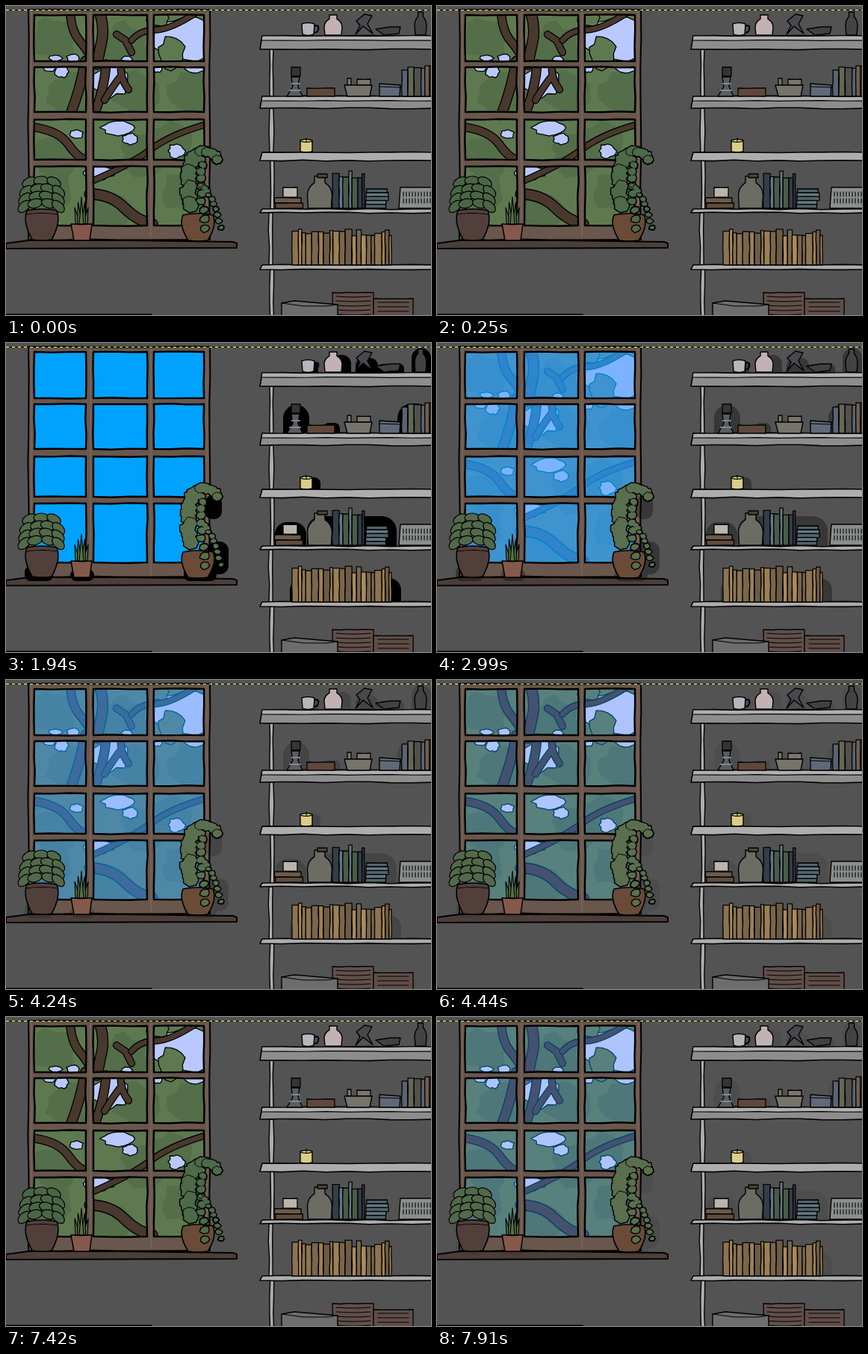
An HTML page with a canvas for the animation above (8 s loop, 569x414 px).

```html
<!DOCTYPE html>
<html lang="en">
<head>
<meta charset="utf-8">
<title>Window and shelves</title>
<style>
  html, body { margin: 0; width: 100%; height: 100%; overflow: hidden; background: #535353; }
  canvas { display: block; width: 569px; height: 414px; }
</style>
</head>
<body>
<canvas id="stage" width="569" height="414"></canvas>
<script>
const ctx = document.getElementById('stage').getContext('2d');
const LOOP = 8000;
const INK = '#000000';
const GAMMA = 2.2;
const OVERLAY = [0, 162, 255];
ctx.lineJoin = ctx.lineCap = 'round';

// Reseeded for every picture, so the hand-drawn wobble stays still.
let seed;
const random = () => (seed = (seed * 16807) % 2147483647) / 2147483647;
const between = (lo, hi) => lo + (hi - lo) * random();
const pick = list => list[Math.floor(random() * list.length)];

function polygon(points) {
  const path = new Path2D();
  points.forEach(([x, y]) => path.lineTo(x, y));
  path.closePath();
  return path;
}

// Straight edges broken into short, slightly shaky pieces.
function rough(corners, step = 18, amp = 0.8) {
  return polygon(corners.flatMap(([x, y], i) => {
    const [nx, ny] = corners[(i + 1) % corners.length];
    const n = Math.max(1, Math.round(Math.hypot(nx - x, ny - y) / step));
    return Array.from({ length: n }, (_, k) => [
      x + (nx - x) * k / n + (k && between(-amp, amp)),
      y + (ny - y) * k / n + (k && between(-amp, amp))
    ]);
  }));
}

const corners = (x0, y0, x1, y1) => [[x0, y0], [x1, y0], [x1, y1], [x0, y1]];

function blob(cx, cy, rx, ry, n = 16) {
  return polygon(Array.from({ length: n }, (_, i) => {
    const angle = i / n * Math.PI * 2;
    const r = between(0.8, 1.15);
    return [cx + rx * r * Math.cos(angle), cy + ry * r * Math.sin(angle)];
  }));
}

function paint(path, fill, lw = 1.4, ink = INK) {
  if (fill) { ctx.fillStyle = fill; ctx.fill(path); }
  if (lw) { ctx.strokeStyle = ink; ctx.lineWidth = lw; ctx.stroke(path); }
}
const shape = (d, fill, lw, ink) => paint(new Path2D(d), fill, lw, ink);
const line = (d, lw = 1.1, ink = INK) => shape(d, null, lw, ink);
const block = (x, y, w, h, fill) => paint(rough(corners(x, y, x + w, y + h), 12, 0.5), fill, 1.3);

// Blend in linear light, as the overlay layer does.
function tint(hex, a) {
  const rgb = OVERLAY.map((over, i) => {
    const base = parseInt(hex.slice(1 + i * 2, 3 + i * 2), 16);
    const v = (base / 255) ** GAMMA * (1 - a) + (over / 255) ** GAMMA * a;
    return Math.round(255 * v ** (1 / GAMMA));
  });
  return `rgb(${rgb})`;
}

// Overlay strength: first step, last step, number of steps, value reached.
const fades = [
  [1940, 1940, 1, 1], [2550, 3290, 12, 0.3], [3470, 3470, 1, 0.27], [3700, 3890, 6, 0.42],
  [4040, 4040, 1, 0.4], [4240, 4440, 4, 0.14], [5410, 5410, 1, 0], [5970, 5970, 1, 0.14],
  [7420, 7420, 1, 0], [7910, 7910, 1, 0.14]
];

function strength(t) {
  let a = 0;
  for (const [t0, t1, steps, to] of fades) {
    if (t < t0) break;
    const done = t >= t1 ? steps : Math.floor((t - t0) / (t1 - t0) * (steps - 1)) + 1;
    a += (to - a) * done / steps;
  }
  return a;
}

const columns = [[38, 107], [117, 189], [198, 265]];
const rows = [[12, 74], [82, 142], [152, 206], [215, 294]];

// Centre and radii of the holes in the foliage.
const gaps = [
  [66, 70, 9, 4], [90, 70, 9, 6], [121, 64, 5, 10], [162, 71, 7, 4], [238, 44, 44, 32],
  [58, 83, 9, 5], [74, 88, 9, 8], [140, 100, 24, 22], [203, 84, 6, 5], [252, 84, 14, 6],
  [94, 172, 9, 6], [150, 163, 22, 10], [166, 178, 10, 8], [228, 194, 11, 10], [124, 223, 20, 10]
];
const clumps = [[202, 16, 16, 12], [221, 64, 18, 22]];
const branches = [
  ['M86 10Q88 34 98 46T112 66', 11], ['M126 10Q132 30 128 48T122 78', 14],
  ['M148 38L160 46L168 62', 9], ['M168 46Q180 32 200 32T256 8', 8],
  ['M106 74Q100 110 86 146', 13], ['M134 78Q132 110 118 146', 12],
  ['M154 78Q152 96 164 112M152 96Q140 112 132 126', 9],
  ['M34 162Q70 166 84 186T112 208', 11], ['M270 158Q220 172 194 192T112 236', 8],
  ['M112 252Q140 252 158 270T196 292', 14]
];

function drawTree(a) {
  const ink = tint(INK, a);
  const leaf = tint('#5e7950', a);
  ctx.fillStyle = leaf;
  ctx.fillRect(30, 6, 244, 300);
  for (const [y0, y1] of rows)
    for (const [x0, x1] of columns)
      paint(blob(between(x0 + 20, x1), between(y0 + 30, y1), 32, 28), tint('#536e48', a), 0);
  gaps.forEach(g => paint(blob(...g), tint('#b9c9ff', a), 1.3, ink));
  clumps.forEach(c => paint(blob(...c), leaf, 1.3, ink));
  for (const [d, w] of branches) {
    line(d, w + 1.3, ink);
    line(d, w - 1.3, tint('#49382d', a));
  }
}

function drawWindow(a) {
  paint(rough(corners(30, 5, 273, 313), 40), '#69574d', 2);
  for (const x of [34, 113, 194, 269]) line(`M${x} 8V310`, 2, '#74625a');

  const panes = new Path2D();
  for (const [y0, y1] of rows)
    for (const [x0, x1] of columns) panes.addPath(rough(corners(x0, y0, x1, y1), 22));
  ctx.save();
  ctx.clip(panes);
  drawTree(a);
  ctx.restore();
  paint(panes, null, 2.4);

  shape('M0 318L30 314H160L304 316L309 318V324L0 325Z', '#4c3e38', 2);
}

const floors = [40, 121, 196, 272, 347];
const depths = [18, 16, 11, 5, 6];

function drawShelves() {
  floors.forEach((y, i) => {
    const top = y + depths[i];
    const end = floors[i + 1] || 420;
    const x = 353 + between(-2, 1);
    paint(rough(corners(x, top, x + 5, end), 24, 1), '#adadad', 1.4);
  });
  floors.forEach((y, i) => {
    const bottom = y + depths[i];
    const deep = depths[i] > 12;
    paint(rough([[343, y], [573, y], [573, bottom], [340, bottom]], 30), deep ? '#8d8d8d' : '#adadad', 1.6);
    if (deep) paint(rough([[343, y], [573, y], [573, y + 6], [342, y + 6]], 30, 0.5), '#b0b0b0', 1.2);
  });
}

// Shelf, left, right and height of each soft shadow.
const shelfShadows = [
  [0, 398, 418, 16], [0, 436, 462, 24], [0, 468, 498, 20], [0, 498, 533, 12], [0, 543, 569, 33],
  [1, 371, 406, 38], [1, 425, 447, 14], [1, 524, 569, 40], [2, 398, 421, 16],
  [3, 360, 402, 32], [3, 403, 523, 40], [4, 380, 529, 32]
];

function drawShadows(a) {
  if (!a) return;
  const path = new Path2D();
  for (const [i, x0, x1, h] of shelfShadows)
    path.roundRect(x0, floors[i] - h, x1 - x0, h, [Math.min(h, x1 - x0) / 2, Math.min(h, x1 - x0) / 2, 0, 0]);
  for (const [cx, w, h] of [[44, 38, 20], [102, 32, 16], [260, 44, 20]])
    path.roundRect(cx - w / 2, 319 - h, w, h, 8);
  path.roundRect(270, 266, 28, 44, 12);
  path.roundRect(266, 204, 23, 32, 10);
  ctx.globalAlpha = 1 - (1 - a) ** (1 / GAMMA);
  paint(path, INK, 0);
  ctx.globalAlpha = 1;
}

function pot(cx, top, bottom, w, fill) {
  const r = w / 2, belly = top + (bottom - top) * 0.4;
  shape(`M${cx - r} ${top}Q${cx} ${top - 4} ${cx + r} ${top}Q${cx + r * 1.3} ${belly} ${cx + r * 0.65} ${bottom}` +
    `Q${cx} ${bottom + 2} ${cx - r * 0.65} ${bottom}Q${cx - r * 1.3} ${belly} ${cx - r} ${top}Z`, fill, 1.6);
}

// Overlapping leaves along a curve, merged into one silhouette.
function drawVine(fill, detailed) {
  const chains = [
    [[250, 205], [262, 182], [284, 206], 8], [[248, 205], [242, 240], [247, 268], 10],
    [[262, 205], [260, 240], [266, 298], 6], [[262, 240], [280, 255], [287, 297], 4]
  ];
  const leaves = chains.flatMap(([p, q, s, r]) => Array.from({ length: 10 }, (_, i) => {
    const u = i / 9;
    const [x, y] = [0, 1].map(k => p[k] * (1 - u) ** 2 + 2 * q[k] * u * (1 - u) + s[k] * u * u);
    return blob(x + between(-2, 2), y, r, r * 0.8, 7);
  }));
  leaves.forEach(p => paint(p, null, 2.8));
  leaves.forEach((p, i) => paint(p, fill, i % 3 === 0 && (detailed || i % 2) ? 1 : 0));
}

function drawBush(fill) {
  for (let row = 0; row < 4; row++) {
    const count = 3 + (row > 0);
    for (let k = 0; k < count; k++) {
      const side = k - (count - 1) / 2;
      const path = new Path2D();
      path.ellipse(48 + side * 15 + between(-2, 2), 234 + row * 10 + side * side * 2, 10, 6, side * 0.5, 0, 7);
      paint(path, fill, 1.2);
    }
  }
}

function drawPlants(a) {
  const green = a ? '#52694a' : '#4b6646';
  drawBush(green);
  pot(48, 274, 313, 40, '#523f3b');
  line('M28 279Q48 276 68 279');

  for (const side of [-2, 2, -1, 1, 0]) {
    const x = 101 + side * 2.5;
    shape(`M${x - 3} 292L${x + side * 2} ${256 + Math.abs(side) * 7}L${x + 3} 292Z`, '#567146', 1.1);
  }
  paint(rough([[87, 292], [115, 292], [112, 314], [91, 314]]), '#84594b', 1.5);

  pot(257, 280, 314, 40, '#694b37');
  drawVine(a ? '#5a6f4e' : '#4d6a49', !a);
}

// Symmetric vessel with a neck.
function jar(cx, floor, w, h, neck, fill) {
  const top = floor - h, r = w / 2, n = neck / 2;
  shape(`M${cx - n} ${top}H${cx + n}V${top + h * 0.2}Q${cx + r} ${top + h * 0.35} ${cx + r} ${floor - h * 0.4}` +
    `L${cx + r - 1} ${floor}H${cx - r + 1}L${cx - r} ${floor - h * 0.4}` +
    `Q${cx - r} ${top + h * 0.35} ${cx - n} ${top + h * 0.2}Z`, fill);
}

function books(x, end, floor, low, high, colors) {
  while (x < end) {
    const w = Math.min(between(4, 10), end - x);
    const h = between(low, high);
    block(x, floor - h, w, h, pick(colors));
    x += w;
  }
}

function stack(x, y, w, floor, step, colors) {
  for (let i = 0; y < floor - 1; i++, y += step)
    block(x + between(-1, 1), y, w + between(-2, 2), step, colors[i % colors.length]);
}

function drawItems() {
  shape('M412 27Q420 24 418 32Q416 37 411 35', null, 2);
  shape('M396 24Q404 21 413 24L412 38Q404 41 397 38Z', '#b9b5bf');
  jar(438, 39, 24, 27, 10, '#c2b2b3');
  shape('M469 20L480 11L490 13L484 24L491 37L478 27L468 38L474 26Z', '#49484d');
  shape('M495 31L514 28H528L526 37L506 39Z', '#414144');
  jar(555, 39, 16, 31, 7, '#434245');

  block(382, 82, 12, 12, '#353539');
  shape('M382 95H393L391 108L397 121H376L384 108Z', '#5b5c5d');
  line('M383 104H393M380 113H394', 2, '#85878a');
  block(403, 110, 37, 11, '#5f473b');
  block(470, 98, 18, 8, '#77776f');
  block(457, 97, 5, 9, '#77776f');
  shape('M453 106H490L487 121H457Z', '#74746d');
  shape('M500 104L528 106L527 121H500Z', '#5f6a78');
  line('M500 108L528 109');
  books(530, 569, 121, 34, 41, ['#616855', '#8f7a66', '#6f5e51', '#596372', '#54504b']);

  shape('M394 180Q402 177 410 180V195Q402 197 394 195Z', '#d9cd88');
  line('M394 181Q402 184 410 181M402 182V177');

  stack(360, 257, 35, 271, 7, ['#6c5a49', '#5f4c40']);
  block(371, 243, 19, 13, '#b6b6aa');
  jar(420, 271, 33, 43, 14, '#6b6c64');
  block(417, 225, 13, 5, '#45463f');
  books(437, 480, 271, 40, 50, ['#495c46', '#64758a', '#363c48', '#57695a', '#44464e']);
  stack(482, 245, 29, 271, 5.2, ['#50646b', '#64777d']);
  shape('M528 243H572V271H526Z', '#8c8d8d');
  for (let x = 532; x < 569; x += 4) line(`M${x} 249v6M${x} 258v6`);

  books(383, 516, 347, 39, 48, ['#7a664c', '#8c7351', '#6c5c46', '#9c7f56', '#a98b60']);

  block(437, 384, 55, 34, '#614f4a');
  block(492, 392, 53, 26, '#5f4d48');
  for (let y = 389; y < 414; y += 6) line(`M442 ${y}Q464 ${y + 2} 488 ${y}M498 ${y + 8}H539`);
  shape('M369 398L386 395L444 400V416H369Z', '#6c6d6d');
  line('M369 398L398 402H430L444 400');
}

function drawBorder() {
  line('M0 413.5H195', 1.8);
  ctx.fillStyle = INK;
  ctx.fillRect(0, 5, 569, 1);
  ctx.fillStyle = '#ffff50';
  for (let x = 0; x < 569; x += 8) ctx.fillRect(x, 5, 4, 1);
}

function draw(t) {
  const a = strength(t);
  seed = 41;
  ctx.fillStyle = '#535353';
  ctx.fillRect(0, 0, 569, 414);
  drawWindow(a);
  drawShelves();
  drawShadows(a);
  drawPlants(a);
  drawItems();
  drawBorder();
}

const start = performance.now();
function tick() {
  draw((performance.now() - start) % LOOP);
  requestAnimationFrame(tick);
}
tick();
</script>
</body>
</html>
```
